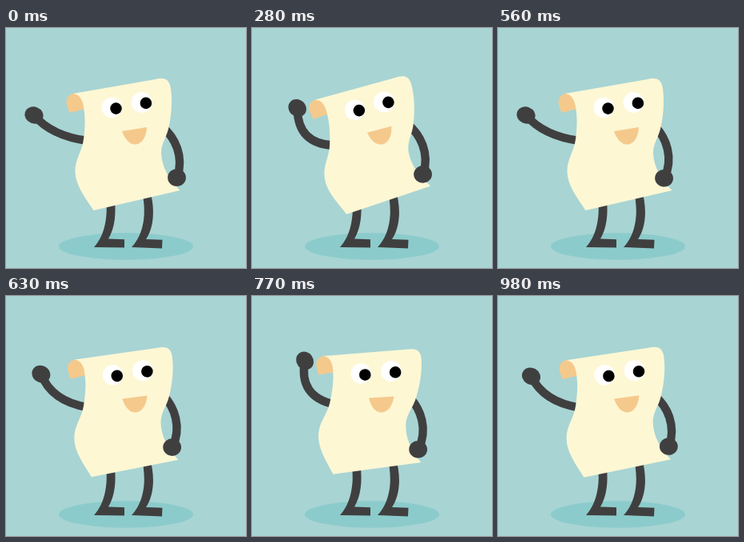
Recreate the animation shown at these times as an HTML page. Size 300 by 300 pixels, loop 1.05 s.

```html
<!DOCTYPE html>
<html lang="en">
<head>
<meta charset="utf-8">
<title>Waving paper</title>
<style>
  html, body { margin: 0; width: 100%; height: 100%; overflow: hidden; background: #a8d4d4; }
  svg { display: block; width: 100%; height: 100%; }
  .limb { fill: none; stroke: #403f40; stroke-width: 10.4; }
  .dark { fill: #403f40; }
  .tan { fill: #f5c98c; }
</style>
</head>
<body>
<svg viewBox="0 0 300 300">
  <rect width="300" height="300" fill="#a8d4d4"/>
  <ellipse cx="150" cy="273" rx="84" ry="16.7" fill="#8ccbcb"/>
  <g class="dark">
    <path d="M124 206C129 236 123 260 110 274L148 274.5V264.3L128 263.5C136 250 138.5 232 135 206Z"/>
    <path d="M169 200C177 232 172 258 157 274L195 275.5L195.5 264.7L175 264C185 250 187 225 179 200Z"/>
  </g>
  <g id="body">
    <path id="waveArm" class="limb"/>
    <ellipse id="waveHand" class="dark" rx="11.8" ry="10.5"/>
    <g class="hipArm"><path class="limb" d="M196 124C211 137 223 160 214 187"/></g>
    <path class="tan" d="M87 81.5C78 82 74 89 76 96L79.5 106L99 101L96 86Z"/>
    <path fill="#fdf7d4" d="M84 82L186 64.2C197 61.5 203 63 205.5 73C208.5 89 207 109 203 126C200 138 194 144 194 157C195 175 205 191 217.5 203L109.5 228C99 212 87 197 86.5 180C86 164 95 155 97 139C99 124 99 112 97.5 102C96.5 90 92 83 84 82Z"/>
    <g fill="#fff">
      <circle cx="132.3" cy="99.5" r="12.7"/>
      <circle cx="169.5" cy="93" r="12.9"/>
    </g>
    <circle cx="137.5" cy="100.6" r="7.3"/>
    <circle cx="174.9" cy="93.9" r="7.3"/>
    <path class="tan" d="M145 129L176 124C175.5 136 170 145 162 145.5C154 146 148 138 145 129Z"/>
    <g class="hipArm"><ellipse class="dark" cx="213.5" cy="187" rx="11.4" ry="10.8"/></g>
  </g>
</svg>
<script>
  const STEP = 70, COUNT = 15;
  const body = document.getElementById("body");
  const waveArm = document.getElementById("waveArm");
  const waveHand = document.getElementById("waveHand");
  const hipArms = document.querySelectorAll(".hipArm");

  // Keys are [step, degrees], joined by straight lines.
  const tilt = [[0, 0], [4, -5.5], [8, 0], [11, 5.4], [15, 0]];
  const wave = [[0, 0], [4, 28], [8, 0], [11, 28], [15, 0]];
  const hip = [[0, 0], [7, 7.5], [13, -2], [15, 0]];

  function valueAt(keys, s) {
    const i = keys.findIndex(k => k[0] > s);
    const [s0, v0] = keys[i - 1], [s1, v1] = keys[i];
    return v0 + (v1 - v0) * (s - s0) / (s1 - s0);
  }

  function turn(el, angle, x, y) {
    el.setAttribute("transform", `rotate(${angle} ${x} ${y})`);
  }

  // The hand swings on an arc while the elbow and shoulder stay put.
  function raiseArm(angle) {
    const a = (angle + 220.1) * Math.PI / 180;
    const x = 85.7 + 66.3 * Math.cos(a), y = 151.7 + 66.3 * Math.sin(a);
    waveArm.setAttribute("d", `M${x} ${y}Q57 135 102 141`);
    waveHand.setAttribute("transform", `translate(${x} ${y}) rotate(${20 + angle})`);
  }

  function draw(ms) {
    const s = Math.floor(ms / STEP) % COUNT;
    turn(body, valueAt(tilt, s), 162, 140);
    raiseArm(valueAt(wave, s));
    hipArms.forEach(el => turn(el, valueAt(hip, s), 203, 130));
  }

  const start = performance.now();
  function tick() {
    draw(performance.now() - start);
    requestAnimationFrame(tick);
  }
  tick();
</script>
</body>
</html>
```
